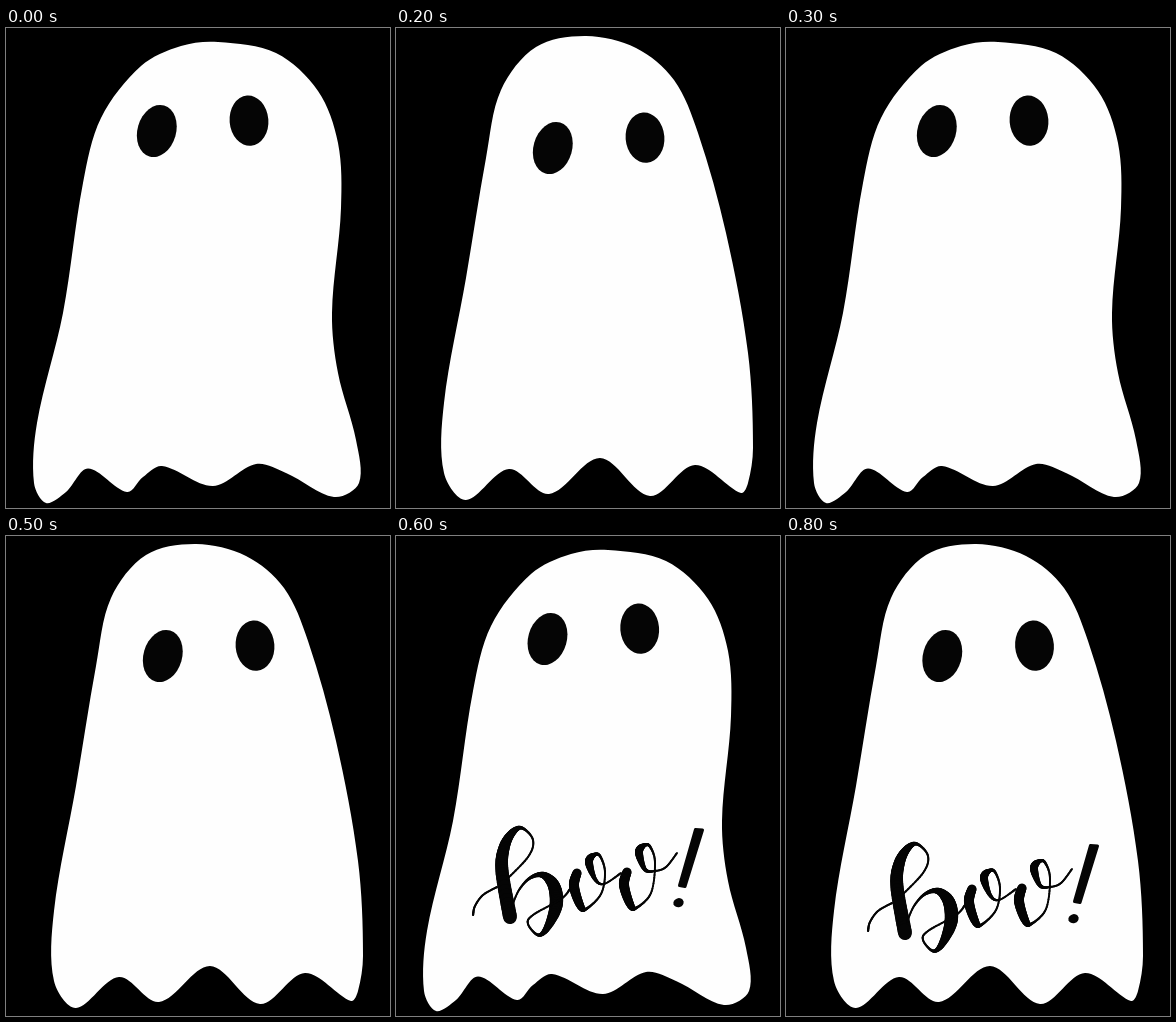
Animation, 384 px wide and 480 px high, one loop 900 ms. Source, as an HTML page with a canvas:

```html
<!DOCTYPE html>
<html lang="en">
<head>
<meta charset="utf-8">
<title>Ghost</title>
<style>
html, body { margin: 0; width: 100%; height: 100%; overflow: hidden; background: #000; }
canvas { display: block; }
</style>
</head>
<body>
<canvas id="stage" width="384" height="480"></canvas>
<script>
const ctx = document.getElementById('stage').getContext('2d');
const STEP = 100, STEPS = 9;
const WHITE = '#fefefe', INK = '#050505';

// Body outlines, clockwise from the top of the head
const leanRight = [212,14, 270,25, 312,63, 332,115, 335,180, 326,285, 332,345, 350,412, 353,455,
  328,469, 280,445, 250,436, 207,458, 156,438, 137,449, 121,464, 82,440.5, 60,464, 40,475,
  28,455, 31,395, 57,285, 77,155, 95,90, 135,38, 175,18];
const wide = [190,13, 232,18, 265,33, 312,86, 331,140, 341,222, 358,350, 360,435, 345,466,
  325,468, 283,444, 264,461, 249,470, 202,445, 152,471, 103,451, 55,471, 38,460, 20,385,
  21,300, 32,215, 60,110, 90,53, 140,20];
const narrow = [190,8, 240,20, 278,52, 302,105, 330,205, 352,325, 357,420, 352,455, 345,465,
  299,437, 254,468, 204,430, 153,466, 113,441, 70,472, 48,445, 48,375, 70,250, 90,130,
  105,62, 140,19];

// nudge: small eye shift while the lettering shows
const poses = [
  { body: leanRight, eyes: [0, 0], word: [0, 0], nudge: 0.7 },
  { body: wide, eyes: [7.2, 14.5], word: [6, 13.5], nudge: 0 },
  { body: narrow, eyes: [6, 17], word: [5, 16], nudge: -0.5 }
];

// Brush strokes as x, y, width
const entry = [77,379,2.2, 79,370,2, 87,359,2, 101,351,2];
const stem = [108,346,2, 132,321,2, 137,304,2, 126,292,3, 116,297,7, 108,312,11, 106,335,13, 114,381,14];
const bowl = [116,370,2, 123,354,2, 134,342,3, 147,339,6, 158,350,12, 160,370,13,
  151,392,7, 142,399,3, 132,388,2, 137,379,2, 165,363,2, 174,353,2];
const oSide = [181,337,9, 178,350,10, 184,369,8, 190,373,3, 205,358,2];
const oLoop = [209,336,2, 204,320,2.5, 198,319,4, 193,326,8, 199,343,4];

const move = (list, dx, dy) => list.map((v, i) => v + [dx, dy, 0][i % 3]);

const strokes = [
  entry, stem, bowl,
  [...oSide, ...oLoop, 208,348,2, 225,337,2],
  [...move(oSide, 50, -1), ...move(oLoop, 50, -9.5), 259,335,2, 270,331,2, 281,317,2]
];

const group = (list, n) =>
  Array.from({ length: list.length / n }, (_, i) => list.slice(i * n, i * n + n));

// Catmull-Rom value between b and c
const spline = (a, b, c, d, t) =>
  b + 0.5 * t * (c - a + t * (2 * a - 5 * b + 4 * c - d + t * (3 * (b - c) + d - a)));

const dist = (a, b) => Math.hypot(a[0] - b[0], a[1] - b[1]);

// Smooth closed shape; handles scale with the length of each segment
function blob(list, color) {
  const p = group(list, 2), n = p.length;
  const at = i => p[(i + n) % n];
  ctx.beginPath();
  ctx.moveTo(...p[0]);
  for (let i = 0; i < n; i++) {
    const [a, b, c, d] = [at(i - 1), at(i), at(i + 1), at(i + 2)];
    const len = dist(b, c);
    const u = len / (3 * (dist(a, b) + len)), v = len / (3 * (len + dist(c, d)));
    ctx.bezierCurveTo(
      b[0] + (c[0] - a[0]) * u, b[1] + (c[1] - a[1]) * u,
      c[0] - (d[0] - b[0]) * v, c[1] - (d[1] - b[1]) * v,
      c[0], c[1]);
  }
  ctx.fillStyle = color;
  ctx.fill();
}

function brush(list) {
  const p = group(list, 3), last = p.length - 1, parts = 12;
  const at = i => p[Math.max(0, Math.min(last, i))];
  let prev = p[0];
  for (let i = 0; i < last; i++) {
    for (let k = 1; k <= parts; k++) {
      const next = [0, 1, 2].map(j =>
        spline(at(i - 1)[j], at(i)[j], at(i + 1)[j], at(i + 2)[j], k / parts));
      ctx.lineWidth = Math.max(1.7, next[2]);
      ctx.beginPath();
      ctx.moveTo(prev[0], prev[1]);
      ctx.lineTo(next[0], next[1]);
      ctx.stroke();
      prev = next;
    }
  }
}

function oval(x, y, rx, ry, tilt) {
  ctx.fillStyle = INK;
  ctx.beginPath();
  ctx.ellipse(x, y, rx, ry, tilt, 0, Math.PI * 2);
  ctx.fill();
}

function shifted(x, y, paint) {
  ctx.save();
  ctx.translate(x, y);
  paint();
  ctx.restore();
}

function eyes() {
  oval(150.8, 103, 19.3, 26.6, 0.28);
  oval(243, 92.7, 19.4, 25.2, -0.08);
}

function word() {
  ctx.strokeStyle = ctx.fillStyle = INK;
  ctx.lineCap = ctx.lineJoin = 'round';
  strokes.forEach(brush);
  // Exclamation mark
  ctx.lineWidth = 3;
  ctx.beginPath();
  ctx.moveTo(299.5, 293.5);
  ctx.lineTo(306.5, 294);
  ctx.lineTo(289, 350.5);
  ctx.lineTo(283.5, 349.5);
  ctx.closePath();
  ctx.fill();
  ctx.stroke();
  oval(282.5, 366.7, 5.2, 4.5, -0.3);
}

function draw() {
  const step = Math.floor(performance.now() / STEP) % STEPS;
  const pose = poses[step % 3];
  const boo = step >= 6;
  ctx.fillStyle = '#000';
  ctx.fillRect(0, 0, 384, 480);
  blob(pose.body, WHITE);
  shifted(pose.eyes[0] + (boo ? pose.nudge : 0), pose.eyes[1], eyes);
  if (boo) shifted(...pose.word, word);
  requestAnimationFrame(draw);
}
draw();
</script>
</body>
</html>
```
